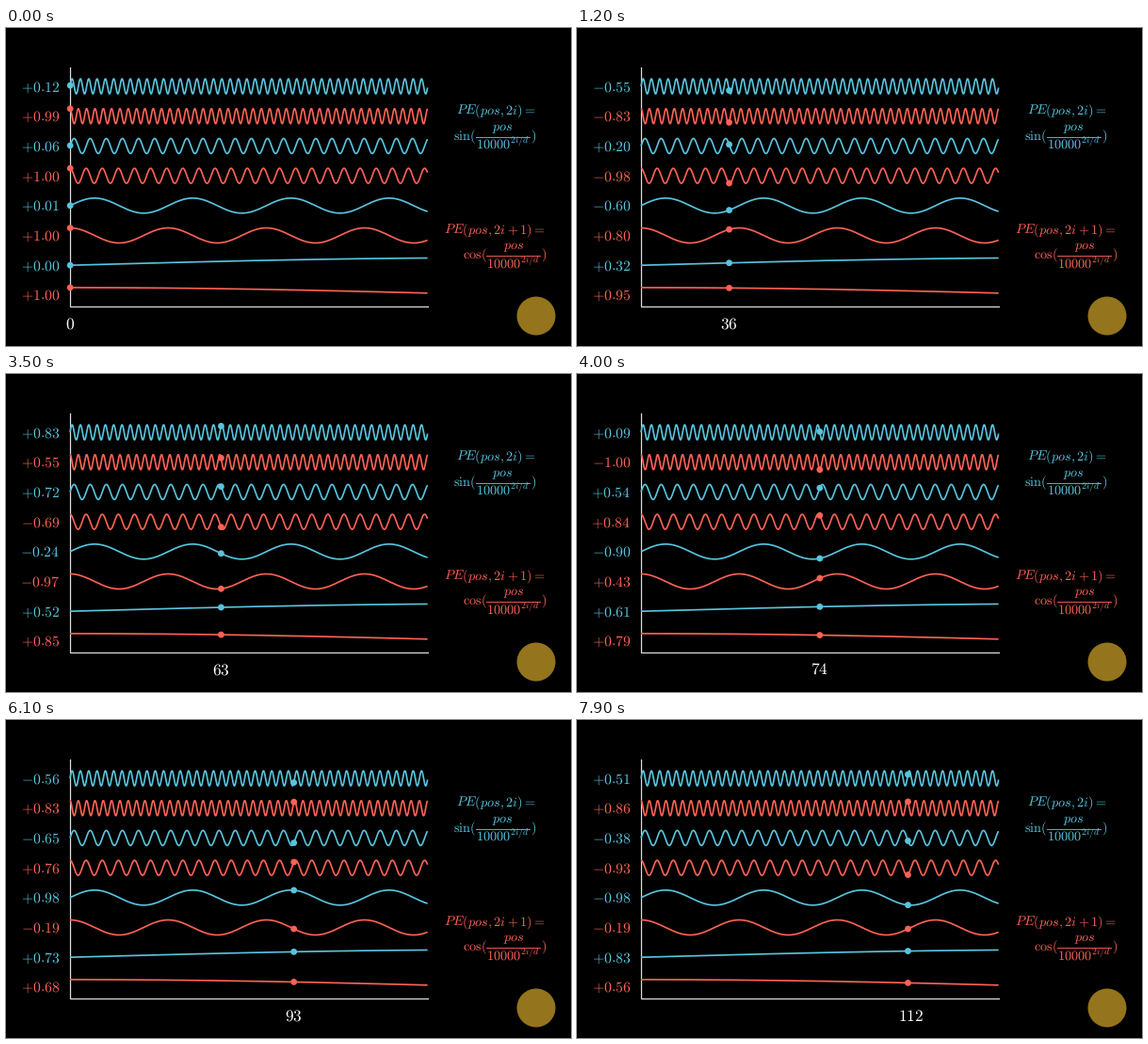
A matplotlib script for the animation above (8 s loop, 600x338 px).

```python
import matplotlib.pyplot as plt
import numpy as np
from matplotlib.animation import FuncAnimation
from matplotlib.patches import Circle

W, H, DPI = 600, 338, 100
PX = 72 / DPI  # points per pixel
BLUE, RED, GOLD = "#58C4DD", "#FC6255", "#94741C"
FRAMES, INTERVAL = 80, 100

X0, SCALE, POS_MAX = 68.0, 2.531, 150
ROW_TOP, ROW_STEP, AMP = 62.0, 31.7, 8.0
FREQS = (1.8, 0.9291, 0.15256, 0.0087)

# start time (s), start value, end value, label drift after stopping (px/s)
MOVES = ((-0.077, 0, 37, 3.5), (2.693, 37, 75, 0.0), (5.427, 75, 112, 2.6))
MOVE_TIME = 1.33

plt.rcParams["mathtext.fontset"] = "cm"
plt.rcParams["text.hinting"] = "none"
plt.rcParams["text.hinting_factor"] = 1

fig = plt.figure(figsize=(W / DPI, H / DPI), dpi=DPI, facecolor="black")
ax = fig.add_axes([0, 0, 1, 1])
ax.set_xlim(0, W)
ax.set_ylim(H, 0)
ax.axis("off")


def tex(x, y, body, size, color, ha="left"):
    return ax.text(x, y, f"${body}$", fontsize=size * PX, color=color,
                   ha=ha, va="baseline")


def line(xs, ys, color, width, **kw):
    ax.plot(xs, ys, color=color, lw=width * PX, **kw)


def formula(x_title, title, x_func, func, x_bar, y, color, em=14.3):
    tex(x_title, y, title, em, color)
    base = y + 26.4
    mid = x_bar + 28.4
    tex(x_func, base, rf"\mathrm{{{func}}}(", em, color)
    tex(mid, base - 9.7, "pos", em, color, "center")
    line([x_bar, x_bar + 57], [base - 3.6] * 2, color, 0.9)
    tex(mid, base + 9.8, "10000^{2i/d}", em, color, "center")
    tex(x_bar + 58, base, ")", em, color)


def smooth(u):
    u = min(max(u, 0), 1)
    return u ** 3 * (10 - 15 * u + 6 * u * u)


def state(t):
    """Position and sideways label drift at time t."""
    start, a, b, rate = [m for m in MOVES if m[0] <= t][-1]
    pos = a + (b - a) * smooth((t - start) / MOVE_TIME)
    return pos, rate * max(0, t - start - MOVE_TIME)


line([X0, X0, X0 + SCALE * POS_MAX], [42, 295.7, 295.7], "#DDDDDD", 1.25)

# rows alternate sine and cosine of the same frequency
rows = []
grid = np.linspace(0, POS_MAX, 3000)
for k in range(8):
    wave, color = ((np.sin, BLUE), (np.cos, RED))[k % 2]
    freq, y = FREQS[k // 2], ROW_TOP + k * ROW_STEP
    line(X0 + SCALE * grid, y - AMP * wave(freq * grid), color, 1.7,
         solid_capstyle="butt")
    dot = ax.add_patch(Circle((X0, y), 3.4, color=color, lw=0, zorder=4))
    value = tex(36.3, y + 5.3, "+0.00", 15.7, color, "center")
    rows.append((wave, freq, y, dot, value))

label = tex(X0, 319.8, "0", 17.4, "white", "center")

formula(477.8, "PE(pos,2i)=", 475, "sin", 499.2, 92.7, BLUE)
formula(464.6, "PE(pos,2i+1)=", 484.8, "cos", 510.4, 219, RED)
ax.add_patch(Circle((563, 306), 20.5, color=GOLD, lw=0))


def update(i):
    pos, drift = state(i * INTERVAL / 1000)
    x = X0 + SCALE * pos
    for wave, freq, y, dot, value in rows:
        v = wave(freq * pos)
        dot.center = (x, y - AMP * v)
        value.set_text(f"${v:+.2f}$")
    label.set_text(f"${int(pos)}$")
    label.set_x(x + drift)
    return []


anim = FuncAnimation(fig, update, frames=FRAMES, interval=INTERVAL,
                     init_func=lambda: update(0), repeat=True, repeat_delay=0)
plt.show()
```
